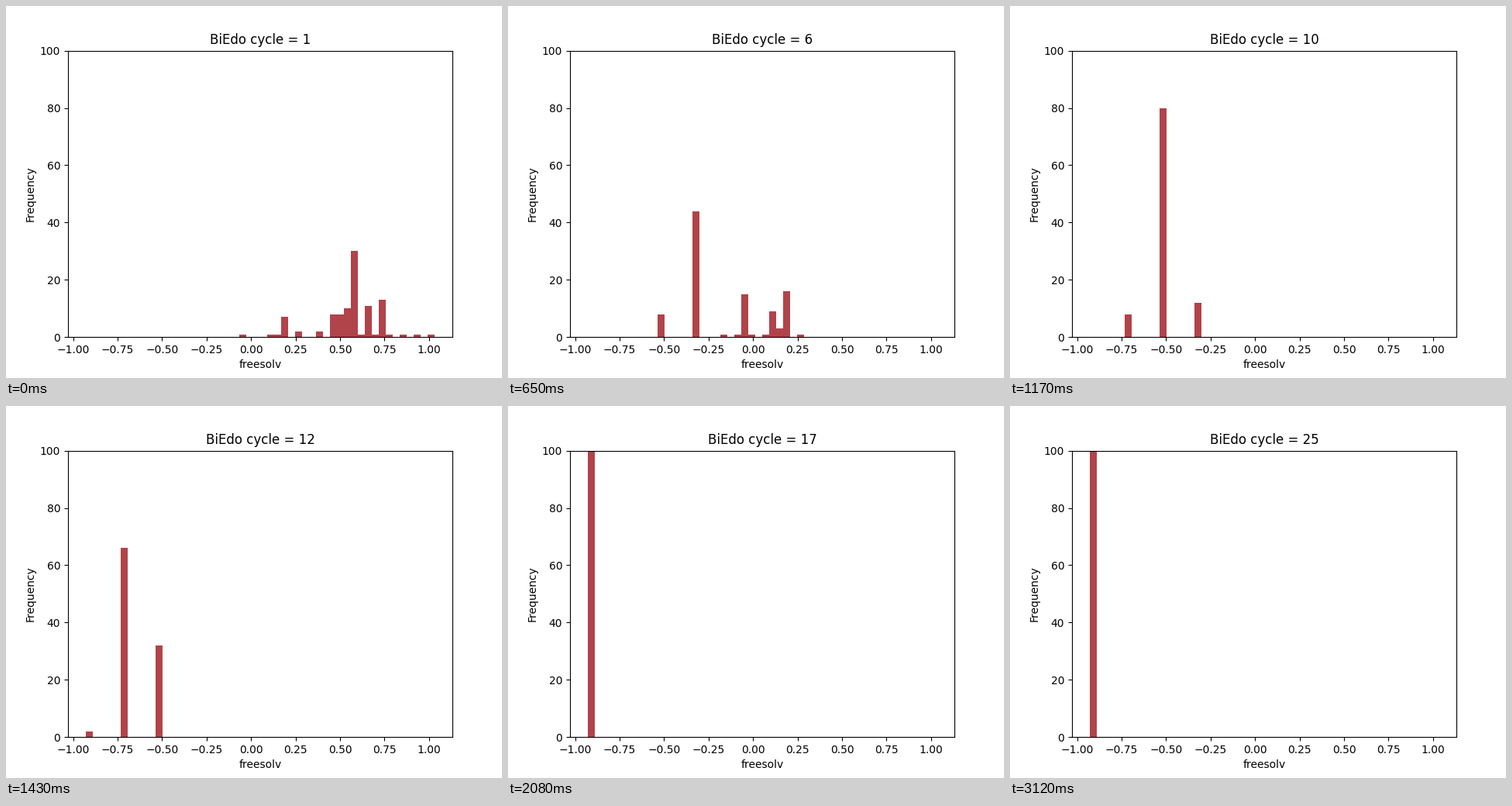
A matplotlib script for the animation above (3.25 s loop, 640 by 480 pixels).

```python
import numpy as np
import matplotlib.pyplot as plt
from matplotlib.animation import FuncAnimation

CYCLES = 25
BINS = 50
LOW, HIGH = -0.9309, 1.0338
RED = "#b1434a"

# The population is a bell that slides left and narrows, seen through
# a comb of bins that are reached more or less often.
KEY_CYCLES = [1, 4, 8, 10, 14, 17]
CENTRES = [38, 23, 16, 10.25, 3, -4.2]
VARIANCES = [75, 30, 12, 6, 6, 6]
PEAKS = {22: 0.5, 26: 0.7, 27: 0.3, 28: 2.6, 30: 0.5, 33: 0.5,
         35: 1.6, 36: 1.4, 37: 1.8, 38: 5, 40: 2.1, 42: 2.6}


def make_comb():
    comb = np.zeros(BINS)
    comb[:16:5] = 2
    comb[17::2] = 0.2 * (np.arange(17, BINS, 2) / 40) ** 3
    for index, strength in PEAKS.items():
        comb[index] = strength
    return comb


COMB = make_comb()


def population(cycle):
    """Counts per bin, summing to 100."""
    centre = np.interp(cycle, KEY_CYCLES, CENTRES)
    variance = np.interp(cycle, KEY_CYCLES, VARIANCES)
    share = COMB * np.exp(-(np.arange(BINS) - centre) ** 2 / (2 * variance))
    counts = np.round(100 * share / share.sum())
    counts[counts.argmax()] += 100 - counts.sum()
    return counts


fig, ax = plt.subplots(figsize=(6.4, 4.8), dpi=100)
edges = np.linspace(LOW, HIGH, BINS + 1)
bars = ax.bar(edges[:-1], np.zeros(BINS), width=np.diff(edges), align="edge",
              color=RED, linewidth=0)
margin = 0.05 * (HIGH - LOW)
ax.set_xlim(LOW - margin, HIGH + margin)
ax.set_ylim(0, 100)
ax.set_xlabel("freesolv")
ax.set_ylabel("Frequency")
title = ax.set_title("")


def update(i):
    cycle = i + 1
    for bar, n in zip(bars, population(cycle)):
        bar.set_height(n)
    title.set_text(f"BiEdo cycle = {cycle}")
    return [*bars, title]


anim = FuncAnimation(fig, update, frames=CYCLES, interval=130, repeat=True,
                     repeat_delay=0, blit=False)
plt.show()
```
